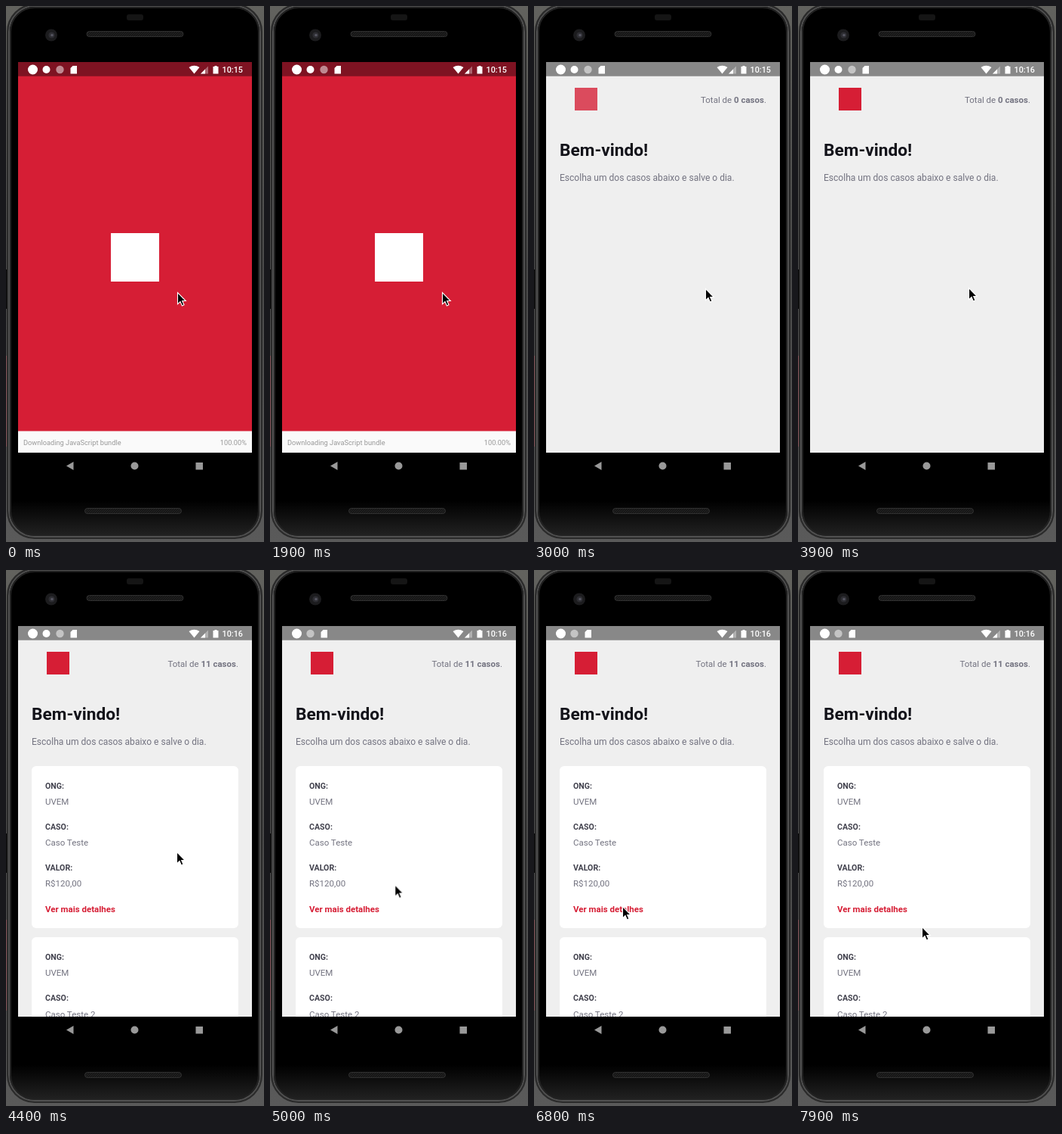
Write an HTML page that moves like this. It is 342 px wide and 708 px high and loops after 8 s.

```html
<!DOCTYPE html>
<html lang="pt-BR">
<head>
<meta charset="utf-8">
<title>App start</title>
<style>
html, body { margin: 0; width: 100%; height: 100%; overflow: hidden; background: #000; }
svg { display: block; width: 342px; height: 708px; }
text { font-family: Roboto, sans-serif; white-space: pre; }

.splash, .home, .early, .late, .empty, .loaded, .shield, .shift {
  animation: 8s step-end infinite;
}
.splash { animation-name: untilHome; }
.home { animation-name: fromHome; }
.early { animation-name: untilMinute; }
.late { animation-name: fromMinute; }
.empty { animation-name: untilData; }
.loaded { animation-name: fromData; }
.shield { animation-name: untilIcon; }
.shift { animation-name: slideIcons; }
.logo { animation: logoFade 8s infinite; }
.cursor { animation: move 8s infinite; }

@keyframes untilHome { 0% { opacity: 1 } 30%, 100% { opacity: 0 } }
@keyframes fromHome { 0% { opacity: 0 } 30%, 100% { opacity: 1 } }
@keyframes untilMinute { 0% { opacity: 1 } 40%, 100% { opacity: 0 } }
@keyframes fromMinute { 0% { opacity: 0 } 40%, 100% { opacity: 1 } }
@keyframes untilData { 0% { opacity: 1 } 55%, 100% { opacity: 0 } }
@keyframes fromData { 0% { opacity: 0 } 55%, 100% { opacity: 1 } }
@keyframes untilIcon { 0% { opacity: 1 } 60%, 100% { opacity: 0 } }
@keyframes slideIcons { 0% { transform: none } 60%, 100% { transform: translateX(-18px) } }
@keyframes logoFade {
  0%, 33.75% { opacity: 0; animation-timing-function: steps(3) }
  37.5% { opacity: .78; animation-timing-function: steps(2) }
  40%, 100% { opacity: 1 }
}
@keyframes move {
  0% { transform: translate(227px, 378px); animation-timing-function: step-end }
  11.25%, 33.75% { transform: translate(228px, 378px); animation-timing-function: steps(3) }
  37.5% { transform: translate(227px, 373px); animation-timing-function: steps(2) }
  40% { transform: translate(226px, 372px); animation-timing-function: step-end }
  55% { transform: translate(226px, 372px); animation-timing-function: steps(8) }
  65% { transform: translate(145px, 430px); animation-timing-function: steps(4) }
  70% { transform: translate(136px, 437px); animation-timing-function: steps(4) }
  75% { transform: translate(117px, 444px); animation-timing-function: step-end }
  93.75% { transform: translate(117px, 444px); animation-timing-function: steps(4) }
  98.75%, 100% { transform: translate(164px, 471px) }
}

.note { font-size: 9.25px; fill: #999; }
.clock { font-size: 10.8px; font-weight: 500; fill: #fff; }
.title { font-size: 22.7px; font-weight: 700; fill: #13131a; }
.intro { font-size: 12.05px; fill: #737380; }
.total, .value { font-size: 11.5px; fill: #737380; }
.total { text-anchor: end; }
.bold { font-weight: 700; }
.label { font-size: 10.6px; font-weight: 700; fill: #41414d; }
.link { font-size: 11.5px; font-weight: 700; fill: #d61e35; }
</style>
</head>
<body>
<svg viewBox="0 0 342 708">
  <defs>
    <linearGradient id="wall" x2="0" y2="1">
      <stop offset="0" stop-color="#62625e"/>
      <stop offset=".5" stop-color="#484848"/>
      <stop offset="1" stop-color="#5a5a5a"/>
    </linearGradient>
    <linearGradient id="chin" x2="0" y2="1">
      <stop offset=".93" stop-color="#000"/>
      <stop offset="1" stop-color="#242424"/>
    </linearGradient>
    <pattern id="mesh" width="3" height="3" patternUnits="userSpaceOnUse">
      <path d="M0 0H3V3H0Z" fill="#151515"/>
      <path d="M0 3L3 0" stroke="#2c2c2c" stroke-width=".7"/>
    </pattern>
    <clipPath id="screen"><path d="M16 74.500H326V589.200H16Z"/></clipPath>
    <g id="card">
      <rect x="34" y="259" width="274" height="214" rx="6" fill="#fff"/>
      <text class="label" x="52" y="289">ONG:</text>
      <text class="value" x="52" y="310">UVEM</text>
      <text class="label" x="52" y="343">CASO:</text>
    </g>
  </defs>

  <!-- phone -->
  <path d="M0 0H342V708H0Z" fill="url(#wall)"/>
  <path d="M0 348H2V400H0Z" fill="#000"/>
  <path d="M0 462H1V582H0Z" fill="#86565b"/>
  <g fill="none" stroke-width="2">
    <rect x="2" y="-2" width="337" height="705" rx="36" fill="url(#chin)" stroke="#2a2a2a"/>
    <rect x="4" y="0" width="333" height="701" rx="34" stroke="#505050"/>
    <rect x="6" y="2" width="329" height="697" rx="32" stroke="#222"/>
  </g>
  <rect x="160" y="11" width="22" height="8" rx="3" fill="#151515"/>
  <circle cx="60" cy="38.500" r="8" fill="#1c1c1e"/>
  <circle cx="60.500" cy="38.500" r="4" fill="#2e2e33"/>
  <circle cx="61" cy="38.500" r="1.800" fill="#555560"/>
  <g fill="url(#mesh)" stroke="#303030">
    <rect x="107" y="33.500" width="128" height="7" rx="3.500"/>
    <rect x="104.500" y="663.500" width="128" height="7" rx="3.500"/>
  </g>
  <g fill="#999">
    <path d="M80 607.500L89.500 602V613Z"/>
    <circle cx="170.500" cy="607.500" r="5"/>
    <path d="M251.500 603H261V612.500H251.500Z"/>
  </g>

  <g clip-path="url(#screen)">
    <g class="splash">
      <path d="M16 74H326V590H16Z" fill="#d61e35"/>
      <path d="M16 74H326V92.700H16Z" fill="#7e1322"/>
      <rect x="139" y="300" width="64" height="64" fill="#fff"/>
      <path d="M16 561.600H326V590H16Z" fill="#fafafa"/>
      <text class="note" x="23" y="580">Downloading JavaScript bundle</text>
      <text class="note" x="319" y="580" text-anchor="end">100.00%</text>
    </g>

    <g class="home">
      <path d="M16 74H326V590H16Z" fill="#efefef"/>
      <path d="M16 74H326V92.700H16Z" fill="#888"/>
      <rect class="logo" x="54" y="108" width="30" height="30" fill="#d61e35"/>
      <text class="total empty" x="308" y="128">Total de <tspan class="bold">0 casos</tspan>.</text>
      <text class="title" x="34" y="198">Bem-vindo!</text>
      <text class="intro" x="34" y="231">Escolha um dos casos abaixo e salve o dia.</text>
      <g class="loaded">
        <text class="total" x="308" y="128">Total de <tspan class="bold">11 casos</tspan>.</text>
        <use href="#card"/>
        <text class="value" x="52" y="364">Caso Teste</text>
        <text class="label" x="52" y="397">VALOR:</text>
        <text class="value" x="52" y="418">R$120,00</text>
        <text class="link" x="52" y="452">Ver mais detalhes</text>
        <use href="#card" y="226"/>
        <text class="value" x="52" y="590.500">Caso Teste 2</text>
      </g>
    </g>

    <!-- status bar -->
    <g fill="#fff">
      <circle cx="35.500" cy="84" r="6.500"/>
      <circle class="shield" cx="53.500" cy="84" r="5"/>
      <g class="shift">
        <circle cx="71.500" cy="84" r="5.200" opacity=".5"/>
        <path d="M85.500 82L88.500 79H94V89.500H85.500Z"/>
      </g>
      <path d="M242.500 81Q249.500 76.500 256.500 81L249.500 89.500Z"/>
      <path d="M258 89.500H268V79.500Z" opacity=".35"/>
      <path d="M258 89.500H264V83.500Z"/>
      <path d="M274.500 80H276.500V79H279.500V80H281.500V89.500H274.500Z"/>
    </g>
    <text class="clock early" x="286.500" y="88">10:15</text>
    <text class="clock late" x="286.500" y="88">10:16</text>
  </g>

  <path class="cursor" d="M.5 .5V15.800L4 12.500L6.400 17.900L9 16.700L6.700 11.500H11.300Z"
    fill="#000" stroke="#fff" stroke-width="1.100"/>
</svg>
</body>
</html>
```
